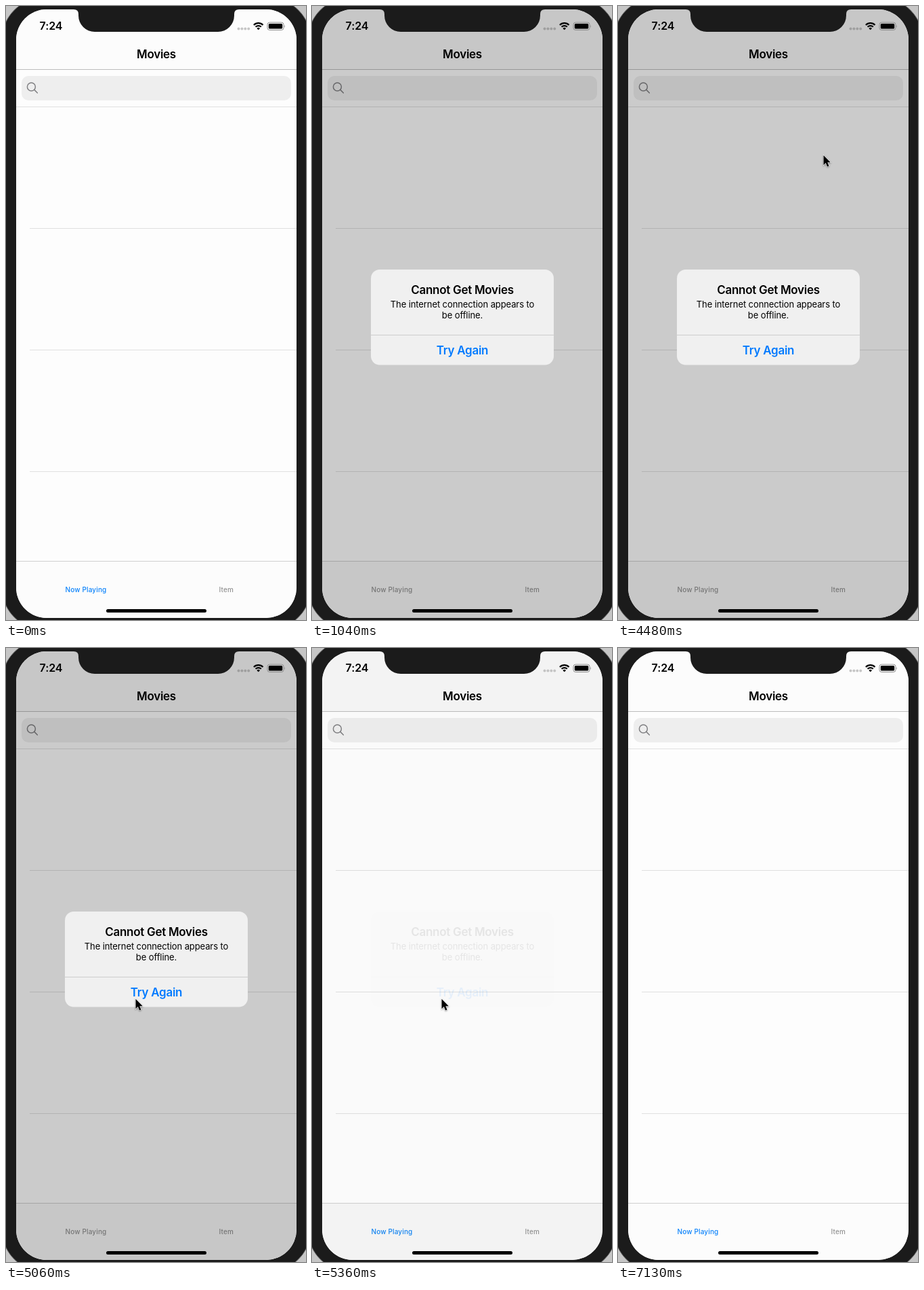
These frames come from a looping animation (443 px wide and 904 px high, 8000 ms). An HTML page:

```html
<!DOCTYPE html>
<html lang="en">
<head>
<meta charset="utf-8">
<title>Movies</title>
<style>
  html, body { margin: 0; width: 100%; height: 100%; overflow: hidden; background: #c6c6c6; }
  svg { display: block; }
  text { font-family: Inter, Roboto, sans-serif; text-anchor: middle; }
  .head { font-size: 17px; font-weight: 600; letter-spacing: -.28px; }
  .note { font-size: 13px; letter-spacing: -.1px; }
  .tab { font-size: 10px; font-weight: 500; letter-spacing: .13px; }
  #pointer { filter: drop-shadow(0 1px 1px #0006); }
</style>
</head>
<body>
<svg width="443" height="904" viewBox="0 0 443 904">
  <clipPath id="display"><rect x="15" y="5" width="414" height="896" rx="45"/></clipPath>
  <rect x="-6" y="-12" width="456" height="930" rx="62" fill="#1b1b1b" stroke="#5a5a5a"/>

  <g clip-path="url(#display)">
    <rect x="15" y="5" width="414" height="896" fill="#fdfdfd"/>
    <g id="bars">
      <rect x="15" y="5" width="414" height="88"/>
      <rect x="15" y="818" width="414" height="83"/>
    </g>
    <path d="M15 93.5H429" stroke="#bdbdbd"/>
    <path d="M15 817.5H429" stroke="#cfcfcf"/>
    <path d="M15 148.5H429M35 327.5H429M35 506.5H429M35 685.5H429" stroke="#e0e0e0"/>

    <rect x="23" y="103" width="398" height="36" rx="10" fill="#eee"/>
    <g fill="none" stroke="#808083" stroke-width="1.5" stroke-linecap="round">
      <circle cx="37.4" cy="119" r="6"/>
      <path d="M41.8 123.4L46.4 128"/>
    </g>

    <g fill="#c6c6c6">
      <circle cx="343.5" cy="33.6" r="2"/><circle cx="348.4" cy="33.6" r="2"/>
      <circle cx="353.3" cy="33.6" r="2"/><circle cx="358.2" cy="33.6" r="2"/>
    </g>
    <text id="tab" class="tab" x="118" y="863">Now Playing</text>
    <text class="tab" x="325.3" y="863" fill="#929292">Item</text>

    <rect id="dim" x="15" y="5" width="414" height="896"/>

    <text x="66.5" y="35.4" font-size="16" font-weight="600" letter-spacing="-.1">7:24</text>
    <text class="head" x="222" y="77">Movies</text>
    <g fill="none" stroke="#000" stroke-width="2.2">
      <path d="M365.9 28A9.4 9.4 0 0 1 379.5 28"/>
      <path d="M368.6 30.8A5.7 5.7 0 0 1 376.8 30.8"/>
    </g>
    <path d="M372.7 35.3L370.4 33A3.2 3.2 0 0 1 375 33Z"/>
    <rect x="386" y="24.2" width="24" height="11.2" rx="3.2" fill="none" stroke="#8c8c8c"/>
    <rect x="387.8" y="26" width="20.4" height="7.6" rx="1.6"/>
    <path d="M411.3 28Q413 29.8 411.3 31.8Z" fill="#8c8c8c"/>
    <rect x="148" y="888" width="148" height="5" rx="2.5"/>

    <path fill="#1b1b1b" d="M98 0V5H100Q107 5 107 12V14A24 24 0 0 0 131 38H313A24 24 0 0 0 337 14V12Q337 5 344 5H346V0Z"/>
  </g>

  <g id="alert">
    <rect x="87" y="388" width="270" height="140.5" rx="13" fill="#f0f0f0"/>
    <path d="M87 484.5H357" stroke="#cdcdcd"/>
    <text class="head" x="222" y="424">Cannot Get Movies</text>
    <text class="note" x="222" y="444">The internet connection appears to</text>
    <text class="note" x="222" y="460">be offline.</text>
    <text class="head" x="222" y="512.7" fill="#007aff">Try Again</text>
  </g>

  <path id="pointer" d="M0 0V14.4L3.3 11.3L5.6 16.6L8 15.6L5.8 10.4H10.3Z" stroke="#fff" stroke-width="1.1" paint-order="stroke"/>
</svg>
<script>
  const LOOP = 8000;

  // start ms, dimming, alert opacity, alert scale, tab tint, bar colour
  const scenes = [
    [0, 0, 0, 1, '#0a82fb', '#fcfcfc'],
    [140, .143, .74, 1.05, '#678cb3', '#f6f6f6'],
    [290, .2, .97, 1.005, '#929292', '#f8f8f8'],
    [440, .2, 1, 1, '#929292', '#f8f8f8'],
    [5210, .13, .67, 1, '#5b8ebf', '#f6f6f6'],
    [5360, .012, .08, 1, '#1084f3', '#f6f6f6'],
    [5510, 0, 0, 1, '#0a82fb', '#fcfcfc']
  ];

  // start ms, pointer x, y
  const moves = [
    [0, -50, -50],
    [4480, 302, 219], [4620, 238, 403], [4770, 212, 492], [4910, 210, 494],
    [5060, 190, 516], [6100, 203, 523], [6250, 231, 566], [6390, 305, 626],
    [6540, 377, 750], [6680, 389, 780], [6830, 427, 876], [6980, 441, 893],
    [7130, -50, -50]
  ];

  const el = id => document.getElementById(id);
  const at = (steps, t) => steps.findLast(step => step[0] <= t);

  function draw(t) {
    const [, dim, opacity, scale, tint, bar] = at(scenes, t);
    const [, x, y] = at(moves, t);
    el('dim').setAttribute('opacity', dim);
    el('bars').setAttribute('fill', bar);
    el('tab').setAttribute('fill', tint);
    el('alert').setAttribute('opacity', opacity);
    el('alert').setAttribute('transform', `translate(222 458.25) scale(${scale}) translate(-222 -458.25)`);
    el('pointer').setAttribute('transform', `translate(${x + 1.5} ${y + .8})`);
  }

  const start = performance.now();
  function tick() {
    draw((performance.now() - start) % LOOP);
    requestAnimationFrame(tick);
  }
  tick();
</script>
</body>
</html>
```
